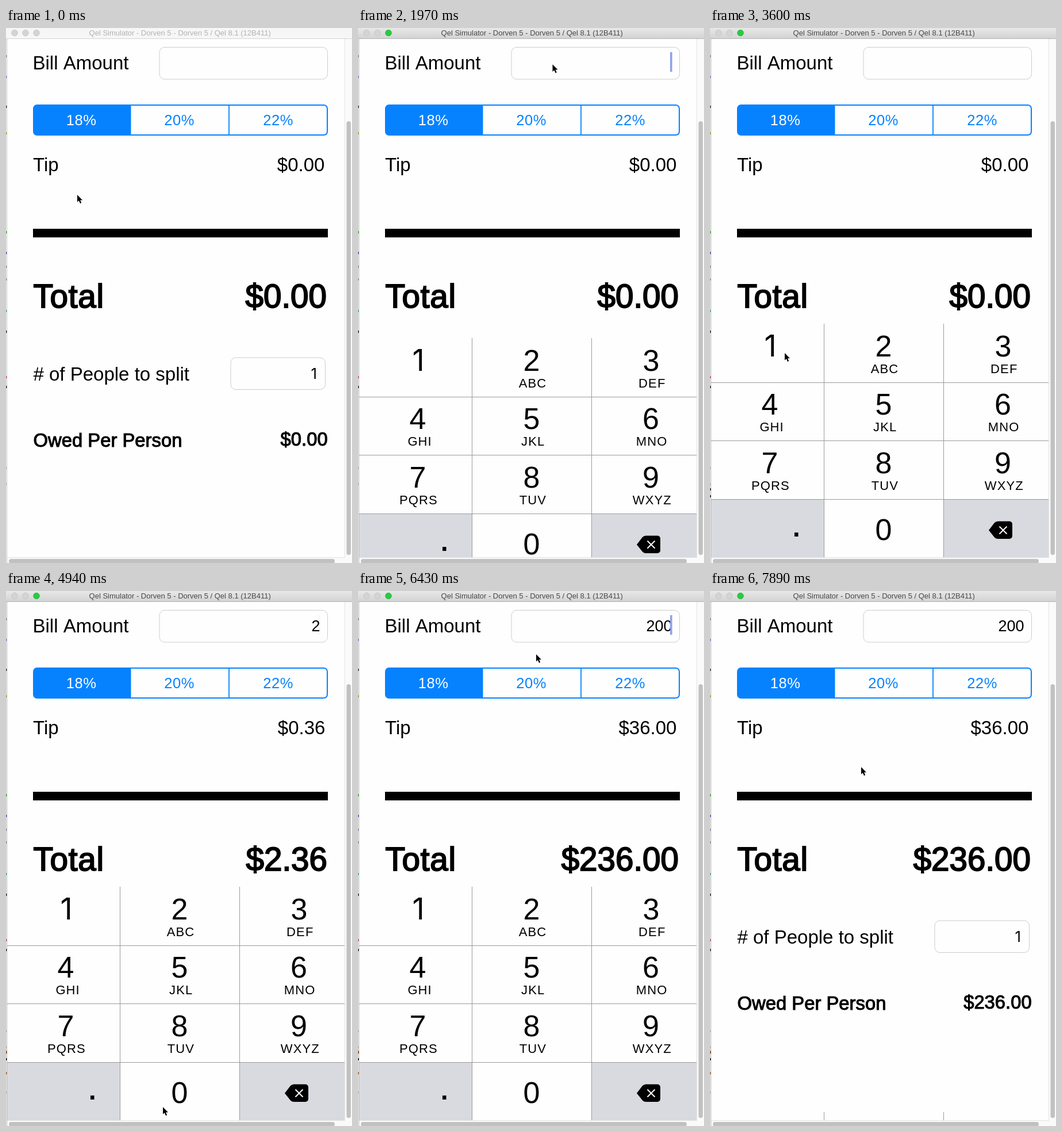
Write an HTML page with a canvas that moves like this. It is 602x930 px and loops after 8 s.

```html
<!DOCTYPE html>
<html lang="en">
<head>
<meta charset="utf-8">
<title>Tip calculator</title>
<style>
html, body { margin: 0; width: 100%; height: 100%; overflow: hidden; background: #fff; }
canvas { display: block; }
</style>
</head>
<body>
<canvas id="stage" width="602" height="930"></canvas>
<script>
const W = 602, H = 930, LOOP = 8000;
const ctx = document.getElementById('stage').getContext('2d');
const BLUE = '#0682ff', PAPER = '#fefefe', KEY_GREY = '#d8dae0';
const SANS = '"Liberation Sans", Arial, sans-serif';
const PLAIN_ONE = 'Inter, sans-serif'; // its 1 has no foot

// Screen refresh times: runs of [first, last, count]
const ticks = [[0, 0, 1], [150, 1040, 7], [1340, 1340, 1], [1640, 2560, 7],
  [2710, 3600, 7], [3900, 4940, 8], [5090, 6130, 8], [6280, 7300, 8], [7450, 7890, 4]]
  .flatMap(([a, b, n]) => Array.from({ length: n }, (_, i) => n > 1 ? a + (b - a) * i / (n - 1) : a));

// Pointer path: [time, x, y]
const path = [
  [0, 124, 290], [1040, 336, 64], [1640, 336, 64], [2400, 343, 62], [2560, 343, 62],
  [3300, 138, 650], [3600, 130, 565], [3780, 130, 565], [4048, 288, 568], [4350, 290, 568],
  [4940, 273, 897], [5833, 272, 895], [6130, 292, 500], [6426, 310, 110],
  [6700, 308, 112], [7300, 263, 306], [LOOP, 263, 306]
];

// Typed digits: [time, amount]; presses: [from, to, key]
const typed = [[4190, 2], [5380, 20], [5830, 200]];
const presses = [[4040, 4190, '2'], [5230, 5380, '0'], [5680, 5830, '0']];
const ACTIVE = 1340, OPEN = 1700, FOCUS = 1790, CLOSE = 7595;

const ease = u => u * u * (3 - 2 * u);
const clamp = u => Math.max(0, Math.min(1, u));

function pointer(t) {
  const i = path.findIndex((p, k) => k && t <= p[0]);
  const [t0, x0, y0] = path[i - 1], [t1, x1, y1] = path[i];
  const u = ease((t - t0) / (t1 - t0));
  return [x0 + (x1 - x0) * u, y0 + (y1 - y0) * u];
}

function rect(x, y, w, h, color) {
  ctx.fillStyle = color;
  ctx.fillRect(x, y, w, h);
}

function round(x, y, w, h, r) {
  ctx.beginPath();
  ctx.roundRect(x, y, w, h, r);
}

function line(x0, y0, x1, y1, color, width = 1) {
  ctx.strokeStyle = color;
  ctx.lineWidth = width;
  ctx.beginPath();
  ctx.moveTo(x0, y0);
  ctx.lineTo(x1, y1);
  ctx.stroke();
}

// Places text by its ink: side 0 = left edge, 0.5 = middle, 1 = right edge
function text(s, x, y, size, { side = 0, gap = 0, color = '#000', heavy = 0, family = SANS } = {}) {
  ctx.font = `${size}px ${family}`;
  ctx.letterSpacing = gap + 'px';
  ctx.textAlign = 'left';
  const m = ctx.measureText(s);
  const left = -m.actualBoundingBoxLeft - heavy / 2;
  const right = m.actualBoundingBoxRight + heavy / 2;
  const px = x - left - (right - left) * side;
  ctx.fillStyle = color;
  ctx.fillText(s, px, y);
  if (heavy) {
    ctx.strokeStyle = color;
    ctx.lineWidth = heavy;
    ctx.lineJoin = 'miter';
    ctx.miterLimit = 3;
    ctx.strokeText(s, px, y);
  }
}

function field(x, y, w, h) {
  round(x, y, w, h, 9);
  ctx.strokeStyle = '#cdcdcd';
  ctx.lineWidth = 1;
  ctx.stroke();
}

function titleBar(active) {
  const g = ctx.createLinearGradient(0, 0, 0, 18);
  g.addColorStop(0, active ? '#e8e8e8' : '#f6f6f6');
  g.addColorStop(1, active ? '#d3d3d3' : '#f6f6f6');
  rect(0, 0, W, 18, g);
  rect(0, 18, W, 1, active ? '#b4b4b4' : '#d4d4d4');
  [15, 34, 53].forEach((x, i) => {
    const on = active && i === 2;
    ctx.beginPath();
    ctx.arc(x, 8.5, 5.3, 0, 7);
    ctx.fillStyle = on ? '#28cb3f' : '#d4d4d4';
    ctx.fill();
    ctx.strokeStyle = on ? '#1fb233' : '#c2c2c2';
    ctx.lineWidth = 0.8;
    ctx.stroke();
  });
  text('Qel Simulator - Dorven 5 - Dorven 5 / Qel 8.1 (12B411)', 302.5, 13, 13,
    { side: 0.5, color: active ? '#484848' : '#b2b2b2' });
}

function windowEdges(t) {
  // Slivers of the editor behind the window
  const marks = [[49, '#999'], [85, '#88d'], [137, '#444'], [183, '#aa3'], [355, '#4a4'],
    [391, '#55c'], [415, '#999'], [437, '#999'], [492, '#5aa'], [528, '#333'],
    [607, '#d55'], [624, '#333'], [765, '#bbb'], [793, '#bbb']];
  if (t >= 2090) marks.push([802, '#222'], [814, '#222']);
  if (t >= 4190) marks.push([801, '#a62'], [838, '#a62'], [872, '#bbb']);
  rect(0, 19, 1, H, '#fafafa');
  rect(1, 19, 1, H, t >= ACTIVE ? '#b3b3b3' : '#c4c4c4');
  for (const [y, c] of marks) rect(0, y - 2, 1.5, 4, c);

  rect(589, 19, 13, H, '#fafafa');
  rect(2, 920, 600, 10, '#fafafa');
  rect(589, 19, 1, 901, '#e3e3e3');
  rect(2, 920, 588, 1, '#e3e3e3');
  ctx.fillStyle = '#c1c1c1';
  round(592.5, 162, 7.5, 754, 4);
  ctx.fill();
  round(5, 923, 567, 8, 4);
  ctx.fill();
}

function caret(t, since) {
  const p = (t - since) / 1000 % 1;
  ctx.globalAlpha = p < 0.85 ? 1 - clamp((p - 0.64) / 0.12) : clamp((p - 0.9) / 0.1);
  rect(543, 42, 3.6, 34, '#8da1ec');
  ctx.globalAlpha = 1;
}

function tipPicker() {
  round(48, 134, 511, 52, 6);
  ctx.save();
  ctx.clip();
  rect(47, 133, 170.5, 54, BLUE);
  ctx.restore();
  round(48, 134, 511, 52, 6);
  ctx.strokeStyle = BLUE;
  ctx.lineWidth = 2;
  ctx.stroke();
  line(388, 134, 388, 186, BLUE, 1.8);
  ['18%', '20%', '22%'].forEach((s, i) =>
    text(s, [131, 301.5, 473.5][i], 169, 25.5, { side: 0.5, gap: 0.5, color: i ? BLUE : '#fff' }));
}

function form(t) {
  const last = typed.filter(([at]) => t >= at).pop();
  const amount = last ? last[1] : 0;
  const tip = amount * 0.18;
  const money = v => '$' + v.toFixed(2);

  text('Bill Amount', 48.5, 72, 33);
  field(267, 33.5, 292.5, 55.5);
  if (amount) text(String(amount), 545.5, 70, 27, { side: 1 });
  if (t >= FOCUS && t < CLOSE) caret(t, last ? last[0] : FOCUS);

  tipPicker();
  text('Tip', 47, 249, 33);
  text(money(tip), 554, 249, 33, { side: 1 });
  rect(47, 349, 513, 15, '#000');
  text('Total', 47.5, 485.5, 56.5, { heavy: 2, gap: 0.8 });
  text(money(amount + tip), 557.5, 485.5, 56.5, { heavy: 2, side: 1 });

  text('# of People to split', 47.5, 613, 33);
  field(391, 573, 164.5, 55.5);
  text('1', 539.5, 609.5, 26, { side: 1, family: PLAIN_ONE });
  text('Owed Per Person', 48, 728, 32.8, { heavy: 1.1 });
  text(money(amount + tip), 559, 726, 32.8, { heavy: 1.1, side: 1 });
}

function deleteIcon() {
  ctx.fillStyle = '#000';
  ctx.beginPath();
  ctx.moveTo(485, 873);
  ctx.lineTo(495, 860);
  ctx.quadraticCurveTo(497.5, 857.5, 501, 857.5);
  ctx.arcTo(526, 857.5, 526, 888, 5);
  ctx.arcTo(526, 888, 490, 888, 5);
  ctx.lineTo(501, 888);
  ctx.quadraticCurveTo(497.5, 888, 495, 885.5);
  ctx.fill();
  line(503.5, 866.5, 516.5, 879.5, '#fff', 2);
  line(516.5, 866.5, 503.5, 879.5, '#fff', 2);
}

function keyboard(t) {
  if (t < OPEN) return;
  const lag = 88;
  const hidden = t < CLOSE ? Math.exp(-(t - OPEN) / lag) : 1 - Math.exp(-(t - CLOSE) / lag);
  const pressed = presses.find(([a, b]) => t >= a && t < b);
  const cols = [2, 198, 406, 589], rows = [514, 616, 717.5, 819, 920];
  const mid = [104, 302, 509.5];
  const letters = ['', 'ABC', 'DEF', 'GHI', 'JKL', 'MNO', 'PQRS', 'TUV', 'WXYZ'];
  const letterMid = [0, 303.5, 511.5, 107, 304, 511, 105, 304, 511];

  ctx.save();
  ctx.beginPath();
  ctx.rect(2, 19, 587, 901);
  ctx.clip();
  ctx.translate(0, Math.round(406 * hidden));
  rect(2, 514, 587, 406, PAPER);
  const cell = (c, r) =>
    rect(cols[c], rows[r], cols[c + 1] - cols[c], rows[r + 1] - rows[r], KEY_GREY);
  cell(0, 3);
  cell(2, 3);
  if (pressed) cell(1, pressed[2] === '0' ? 3 : 0);

  for (const y of [616.5, 717.5, 819.5]) line(2, y, 589, y, '#9b9b9b');
  for (const x of [198.5, 406.5]) line(x, 514, x, 920, '#9b9b9b');
  letters.forEach((s, i) => {
    const y = 571 + Math.floor(i / 3) * 101.4;
    text(String(i + 1), mid[i % 3], y, 52, { side: 0.5, family: i ? SANS : PLAIN_ONE });
    if (s) text(s, letterMid[i], y + 28.7, 22, { side: 0.5, gap: 1.1 });
  });
  text('0', 302, 889.5, 52, { side: 0.5 });
  rect(147, 877, 6.5, 7, '#000');
  deleteIcon();
  ctx.restore();
}

function arrow([x, y]) {
  ctx.save();
  ctx.translate(x, y);
  ctx.beginPath();
  [[0, 0], [0, 12.6], [2.9, 10], [5, 15], [7.2, 14], [5.1, 9.2], [9, 9.2]]
    .forEach(p => ctx.lineTo(...p));
  ctx.closePath();
  ctx.strokeStyle = '#fff';
  ctx.lineWidth = 2;
  ctx.lineJoin = 'round';
  ctx.stroke();
  ctx.fillStyle = '#000';
  ctx.fill();
  ctx.restore();
}

function draw(now) {
  const clock = now % LOOP;
  const t = ticks.filter(at => at <= clock + 0.5).pop();
  rect(0, 0, W, H, PAPER);
  form(t);
  keyboard(t);
  windowEdges(t);
  titleBar(t >= ACTIVE);
  arrow(pointer(t));
}

let start;
function loop(now) {
  start ??= now;
  draw(now - start);
  requestAnimationFrame(loop);
}
draw(0);
requestAnimationFrame(loop);
</script>
</body>
</html>
```
